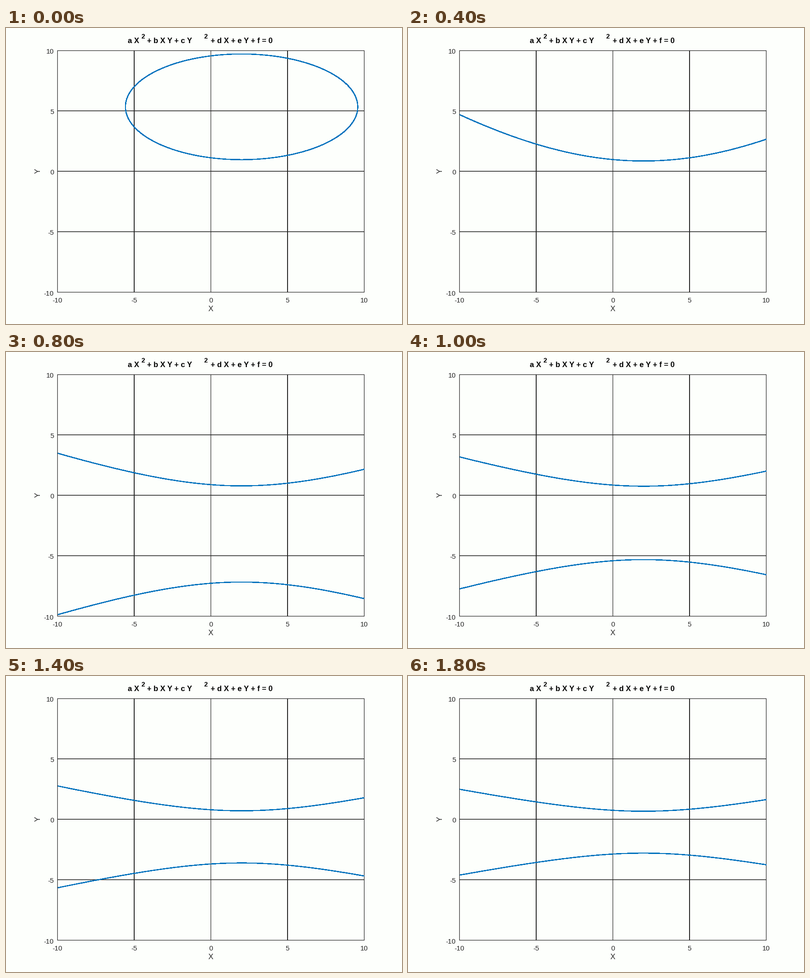
These frames come from a looping animation (865x647 px, 1900 ms). A matplotlib script:

```python
import numpy as np
import matplotlib.pyplot as plt
from matplotlib.animation import FuncAnimation
from matplotlib.patches import Rectangle

W, H, DPI = 865, 647, 64
LEFT, RIGHT, TOP, BOTTOM = 112.5, 782.7, 49, 577.4
FRAMES, STEP_MS = 19, 100
PAPER, INK, BLUE = "#FDFFFC", "#262626", "#0072BD"

plt.rcParams["font.family"] = "Liberation Sans"


def pt(px):
    return px * 72 / DPI


def to_px(x, y):
    """Map data in -10..10 to stage pixels."""
    return (LEFT + (x + 10) / 20 * (RIGHT - LEFT),
            BOTTOM - (y + 10) / 20 * (BOTTOM - TOP))


fig = plt.figure(figsize=(W / DPI, H / DPI), dpi=DPI, facecolor=PAPER)
ax = fig.add_axes([0, 0, 1, 1])
ax.set_xlim(0, W)
ax.set_ylim(H, 0)
ax.axis("off")


def rule(xs, ys, px):
    ax.plot(xs, ys, color=INK, lw=pt(px), snap=False,
            solid_capstyle="butt", zorder=2)


def label(x, y, text, px, color=INK, **kw):
    ax.text(x, y, text, fontsize=pt(px), color=color, **kw)


# Grid, frame and tick labels
for v in range(-10, 11, 5):
    gx, gy = to_px(v, v)
    edge = abs(v) == 10
    heavy = abs(v) == 5
    col = round(gx) if heavy else int(gx) + 0.5
    row = int(gy) + 0.5 if edge else gy
    rule([col, col], [TOP, BOTTOM + 0.6], 2 if heavy else 1.2)
    rule([LEFT - 0.5, RIGHT + 0.3], [row, row], 1.2 if edge else 1.6)
    label(gx - 0.2, 599.5, str(v), 15, ha="center", va="baseline")
    label(104.6, gy + 7.2, str(v), 15, ha="right", va="baseline")

label(447, 619, "X", 16.5, ha="center", va="baseline")
label(70.5, 313, "Y", 16.5, ha="center", va="center", rotation=90)

# Title, with raised exponents
for x, y, text, px in [(266.4, 33, "a X", 16.5),
                       (295.4, 23, "2", 14),
                       (308.3, 33, "+ b X Y + c Y", 16.5),
                       (432.6, 23, "2", 14),
                       (447.3, 33, "+ d X + e Y + f = 0", 16.5)]:
    label(x, y, text, px, "black", weight="bold", va="baseline")

window = Rectangle((LEFT, TOP), RIGHT - LEFT, BOTTOM - TOP,
                   transform=ax.transData)
branches = [ax.plot([], [], color=BLUE, lw=pt(1.5), antialiased=False,
                    zorder=3)[0] for _ in range(2)]
for line in branches:
    line.set_clip_path(window)


def conic(c):
    """Both branches of (x - 2)^2 + c y^2 - 32 y + 28 = 0."""
    if c > 0:
        half = np.sqrt(256 / c - 28)
        x = 2 + half * np.cos(np.linspace(0, np.pi, 400))
    else:
        x = np.linspace(-10, 10, 400)
    q = (x - 2) ** 2 + 28
    root = 16 + np.sqrt(np.maximum(256 - c * q, 0))
    far = root / c if c else np.full_like(x, np.nan)
    return x, q / root, far


def draw(i):
    x, near, far = conic(3 - i)
    for line, y in zip(branches, (near, far)):
        line.set_data(*to_px(x, y))
    return branches


anim = FuncAnimation(fig, draw, frames=FRAMES, interval=STEP_MS,
                     repeat=True, blit=False)
plt.show()
```
